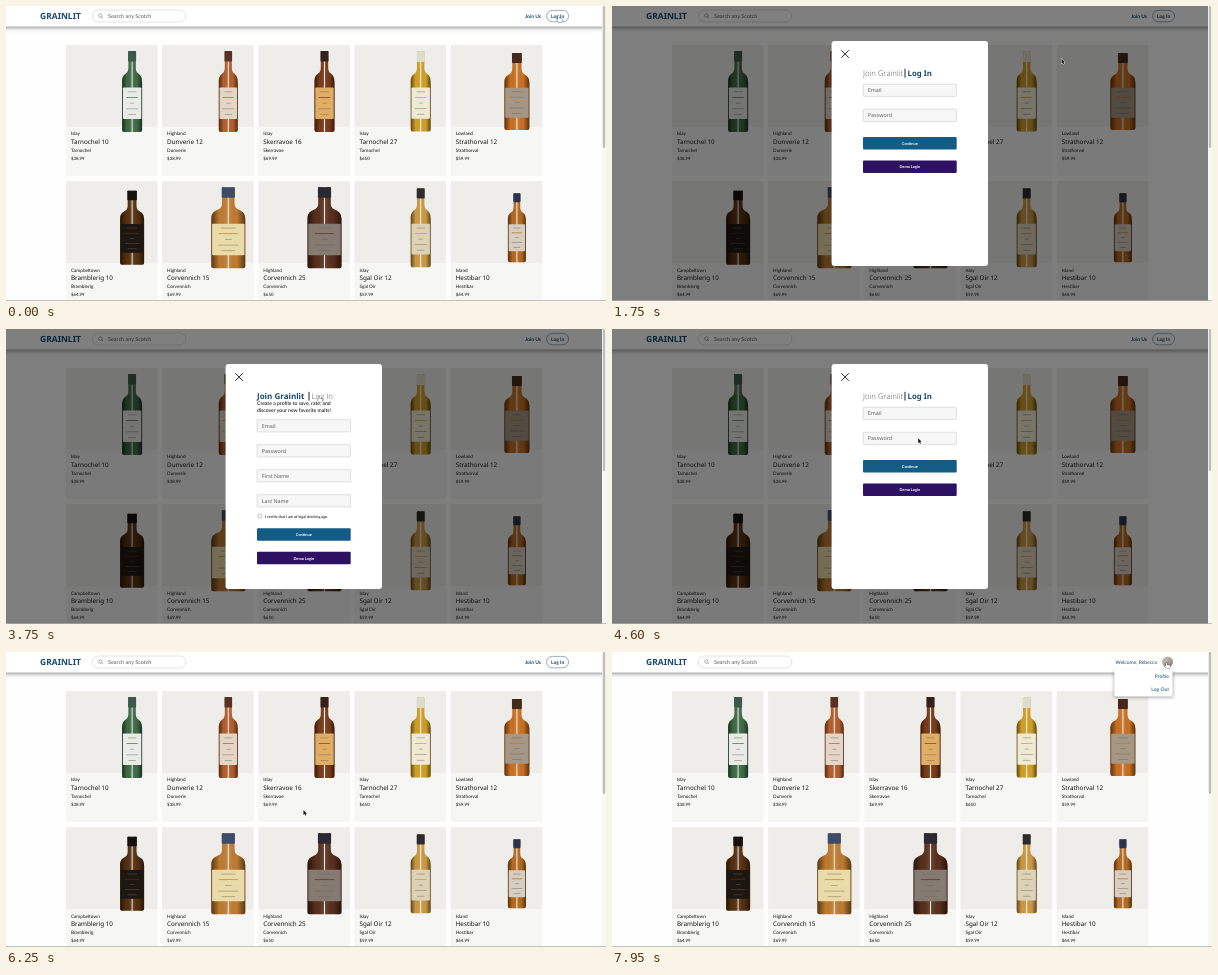
An HTML page with a canvas for the animation above (8 s loop, 600 px wide and 295 px high).

```html
<!DOCTYPE html>
<html lang="en">
<head>
<meta charset="utf-8">
<title>Scotch shop</title>
<style>
  html, body { margin: 0; width: 100%; height: 100%; overflow: hidden; background: #fff; }
  canvas { display: block; width: 600px; height: 295px; }
</style>
</head>
<body>
<canvas id="stage"></canvas>
<script>
const W = 600, H = 295, LOOP = 8000;
const canvas = document.getElementById('stage');
const ctx = canvas.getContext('2d');
const dpr = window.devicePixelRatio || 1;
canvas.width = W * dpr;
canvas.height = H * dpr;

const ROUND = 'Lato, sans-serif';
const HEAD = '"Noto Sans", sans-serif';
const FORM = '"Open Sans", sans-serif';
const NAVY = '#174a70', BLUE = '#135c86', PURPLE = '#2d1263';

// Moments when the page changes
const OPEN = 850, JOIN = 2500, LOGIN = 4050, CLOSE = 6000, WELCOME = 6450, MENU = 7700;

// Cursor moves: leave time, arrival time, destination
const HOME = { x: 552, y: 10 };
const MOVES = [
  { from: 1050, to: 1600, x: 449.5, y: 52.5 },
  { from: 1850, to: 2350, x: 275, y: 67 },
  { from: 3050, to: 3550, x: 312.5, y: 67 },
  { from: 4200, to: 5000, x: 300, y: 151 },
  { from: 5550, to: 5850, x: 297.5, y: 158 },
  { from: 6650, to: 7500, x: 554, y: 10.5 }
];

// Region, name, age, price, bottle width and height, colours of glass, cap and label
const PRODUCTS = [
  ['Islay', 'Tarnochel', 10, '$38.99', 20, 81, '#3f6b46', '#3c5848', '#e9ebe6'],
  ['Highland', 'Dunverie', 12, '$38.99', 19, 81, '#b55e2c', '#5a3024', '#e4d6c6'],
  ['Islay', 'Skerravoe', 16, '$69.99', 20, 81, '#7a3a18', '#35201a', '#dfae64'],
  ['Islay', 'Tarnochel', 27, '$650', 20, 80, '#d3a025', '#dedccb', '#efead6'],
  ['Lowland', 'Strathorval', 12, '$59.99', 25, 77, '#cb7021', '#45281c', '#a59786'],
  ['Campbeltown', 'Bramblerig', 10, '$64.99', 24, 74, '#55300f', '#16130f', '#1d1713'],
  ['Highland', 'Corvennich', 15, '$69.99', 34, 81, '#c07c30', '#3c4c68', '#eadca8'],
  ['Highland', 'Corvennich', 25, '$650', 34, 81, '#5a2f1c', '#2b2a30', '#857b72'],
  ['Islay', 'Sgal Oir', 12, '$59.99', 20, 79, '#cd9a42', '#2c2b2d', '#dcd2b8'],
  ['Island', 'Hestibar', 10, '$64.99', 18, 69, '#b5691f', '#2a3450', '#d6cec0']
];

function text(str, x, y, size, color = '#222', family = ROUND, weight = 500, align = 'left') {
  ctx.font = `${weight} ${size}px ${family}`;
  ctx.textAlign = align;
  ctx.fillStyle = color;
  ctx.fillText(str, x, y);
}

function rect(x, y, w, h, color) {
  ctx.fillStyle = color;
  ctx.fillRect(x, y, w, h);
}

function box(x, y, w, h, r, fill, stroke, line = 0.6) {
  ctx.beginPath();
  ctx.roundRect(x, y, w, h, r);
  if (fill) { ctx.fillStyle = fill; ctx.fill(); }
  if (stroke) { ctx.strokeStyle = stroke; ctx.lineWidth = line; ctx.stroke(); }
}

function disc(x, y, r, fill) {
  ctx.beginPath();
  ctx.arc(x, y, r, 0, Math.PI * 2);
  ctx.fillStyle = fill;
  ctx.fill();
}

function shadowed(blur, dy, alpha, draw) {
  ctx.save();
  ctx.shadowColor = `rgba(0,0,0,${alpha})`;
  ctx.shadowBlur = blur * dpr;
  ctx.shadowOffsetY = dy * dpr;
  draw();
  ctx.restore();
}

function line(x0, y0, x1, y1, color, width) {
  ctx.beginPath();
  ctx.moveTo(x0, y0);
  ctx.lineTo(x1, y1);
  ctx.strokeStyle = color;
  ctx.lineWidth = width;
  ctx.stroke();
}

// Every bottle shares one profile, scaled by its width and height
function bottle(cx, cy, w, h, glass, cap, label) {
  const half = w / 2, neck = half * 0.37;
  const top = cy - h / 2, bottom = cy + h / 2;
  const at = p => top + h * p;

  const outline = new Path2D();
  for (const s of [-1, 1]) {
    outline.moveTo(cx - s * 0.5, top);
    outline.lineTo(cx + s * neck, top);
    outline.lineTo(cx + s * neck, at(0.2));
    outline.bezierCurveTo(cx + s * neck, at(0.31), cx + s * half, at(0.25), cx + s * half, at(0.39));
    outline.lineTo(cx + s * half, bottom - 2);
    outline.quadraticCurveTo(cx + s * half, bottom, cx + s * (half - 2), bottom);
    outline.lineTo(cx - s * 0.5, bottom);
  }
  const shade = ctx.createLinearGradient(cx - half, 0, cx + half, 0);
  ['rgba(0,0,0,.55)', 'rgba(0,0,0,0)', 'rgba(255,255,255,.15)', 'rgba(0,0,0,0)', 'rgba(0,0,0,.55)']
    .forEach((c, i) => shade.addColorStop(i / 4, c));
  for (const fill of [glass, shade]) {
    ctx.fillStyle = fill;
    ctx.fill(outline, 'nonzero');
  }

  box(cx - neck - 0.3, top, neck * 2 + 0.6, h * 0.13, 0.8, cap);
  box(cx - half + 0.8, at(0.45), w - 1.6, h * 0.39, 0.8, label);
  for (let i = 0; i < 5; i++) {
    const len = w * (0.42 + 0.22 * Math.sin(i * 2.4));
    rect(cx - len / 2, at(0.5 + i * 0.07), len, 0.7, i === 1 ? glass : 'rgba(110,95,75,.6)');
  }
}

function card([region, name, age, price, w, h, glass, cap, label], i) {
  const x = 60 + (i % 5) * 96.2;
  const y = 39 + Math.floor(i / 5) * 136.2;
  rect(x, y, 91.4, 131, '#f6f6f5');
  rect(x, y, 91.4, 82, '#eeede9');
  bottle(x + 66.1, y + 46.5, w, h, glass, cap, label);
  text(region, x + 4.9, y + 90.4, 4.7);
  text(`${name} ${age}`, x + 4.9, y + 99.1, 6.3, '#111', HEAD, 500);
  text(name, x + 4.9, y + 107, 4.7);
  text(price, x + 4.9, y + 114.8, 4.4);
}

function header(t) {
  shadowed(4, 1.5, 0.4, () => rect(-8, -8, 612, 28.5, '#fff'));
  text('GRAINLIT', 34, 13.4, 8.5, NAVY, HEAD, 600);
  box(86.3, 4, 93.6, 12, 6, '#fff', '#d0d0d0');
  box(92.7, 7.9, 3.4, 3.4, 1.7, null, '#777');
  line(95.6, 10.8, 97, 12.2, '#777', 0.6);
  text('Search any Scotch', 102, 11.9, 5.45, '#666');

  if (t < WELCOME) {
    text('Join Us', 519, 11.8, 5, NAVY, ROUND, 700);
    box(540.6, 4.4, 22, 11.4, 5.7, '#fff', '#4f7b9a');
    text('Log In', 551.6, 11.8, 4.9, NAVY, ROUND, 700, 'center');
    return;
  }
  text('Welcome, Rebecca', 545, 11.8, 5, '#28587c', ROUND, 500, 'right');
  const photo = ctx.createLinearGradient(550, 5, 561, 16);
  photo.addColorStop(0, '#d3ccc4');
  photo.addColorStop(1, '#81766f');
  disc(555.5, 10, 5.5, photo);
  if (t >= MENU) {
    shadowed(3, 1, 0.35, () => rect(502.3, 17.5, 58.2, 27, '#fff'));
    ['Profile', 'Log Out'].forEach((s, i) =>
      text(s, 557, 25.8 + i * 13.6, 5, '#1c5a86', ROUND, 500, 'right'));
  }
}

function field(label, y) {
  box(251.2, y, 93.2, 12.2, 0.6, '#f7f7f8', '#cbcbcf');
  text(label, 255.8, y + 8.1, 5.4, '#555', FORM, 400);
}

function button(label, y, color) {
  box(251, y, 93.7, 12.5, 1, color);
  text(label, 297.8, y + 7.7, 3.9, '#fff', ROUND, 700, 'center');
}

function modal(joining) {
  rect(0, 0, 596, H, 'rgba(0,0,0,.5)');
  box(219.6, 35, 156.4, 225, 3, '#fff');
  line(229.3, 44.2, 236.9, 51.8, '#111', 0.9);
  line(236.9, 44.2, 229.3, 51.8, '#111', 0.9);

  const on = [NAVY, HEAD, 600], off = ['#555', FORM, 300];
  const bar = joining ? 303 : 293;
  text('Join Grainlit', 251, 70.2, joining ? 8 : 7.8, ...(joining ? on : off));
  rect(bar - 0.5, 62.8, 1, 8.8, '#222');
  text('Log In', bar + 2.6, 70.2, 7.8, ...(joining ? off : on));

  const labels = ['Email', 'Password'];
  if (joining) {
    labels.push('First Name', 'Last Name');
    text('Create a profile to save, rate, and', 251, 76.4, 5.1, '#111');
    text('discover your new favorite malts!', 251, 82.7, 5.1, '#111');
    box(252, 185.2, 3.7, 3.7, 0.6, '#fff', '#888', 0.5);
    text('I certify that I am of legal drinking age.', 259, 188.5, 3.75, '#111');
  }
  labels.forEach((s, i) => field(s, (joining ? 90.7 : 78.2) + i * 25));
  const y = joining ? 199.3 : 131;
  button('Continue', y, BLUE);
  button('Demo Login', y + 23.5, PURPLE);
}

function cursorAt(t) {
  let { x, y } = HOME;
  for (const m of MOVES) {
    const p = Math.min(1, Math.max(0, (t - m.from) / (m.to - m.from)));
    const k = p * p * (3 - 2 * p);
    x += (m.x - x) * k;
    y += (m.y - y) * k;
  }
  return [x, y];
}

const ARROW = new Path2D('M0 0V5L1.1 4 1.9 5.7 2.7 5.3 1.9 3.7H3.4Z');
const HAND = new Path2D('M0 .4Q.5-.3 1 .4V2.3L3.7 2.9Q4.3 3.1 4.1 4L3.5 6H.8L-1.3 3.7Q-1 3 0 3.7Z');

function cursor(t, open) {
  const [x, y] = cursorAt(t);
  const overTab = open && y > 62 && y < 72 && x > 251 && x < 324;
  const overNav = !open && y < 17 && x > 540;
  const hand = overTab || overNav;
  ctx.save();
  ctx.translate(x, y);
  ctx.lineJoin = 'round';
  ctx.lineWidth = hand ? 0.6 : 0.9;
  ctx.strokeStyle = hand ? '#222' : '#fff';
  ctx.fillStyle = hand ? '#fff' : '#111';
  ctx.stroke(hand ? HAND : ARROW);
  ctx.fill(hand ? HAND : ARROW);
  ctx.restore();
}

function draw(t) {
  const open = t >= OPEN && t < CLOSE;
  ctx.setTransform(dpr, 0, 0, dpr, 0, 0);
  ctx.textRendering = 'geometricPrecision';
  rect(0, 0, W, H, '#fefefe');
  PRODUCTS.forEach(card);
  header(t);
  if (open) modal(t >= JOIN && t < LOGIN);
  rect(596, 0, 4, H, '#f8f8f8');
  box(596.8, 0, 2.4, 142, 1.2, '#bebebe');
  rect(0, 294.3, W, 0.7, '#aaa');
  cursor(t, open);
}

const start = performance.now();
function tick() {
  draw((performance.now() - start) % LOOP);
  requestAnimationFrame(tick);
}
tick();
</script>
</body>
</html>
```
